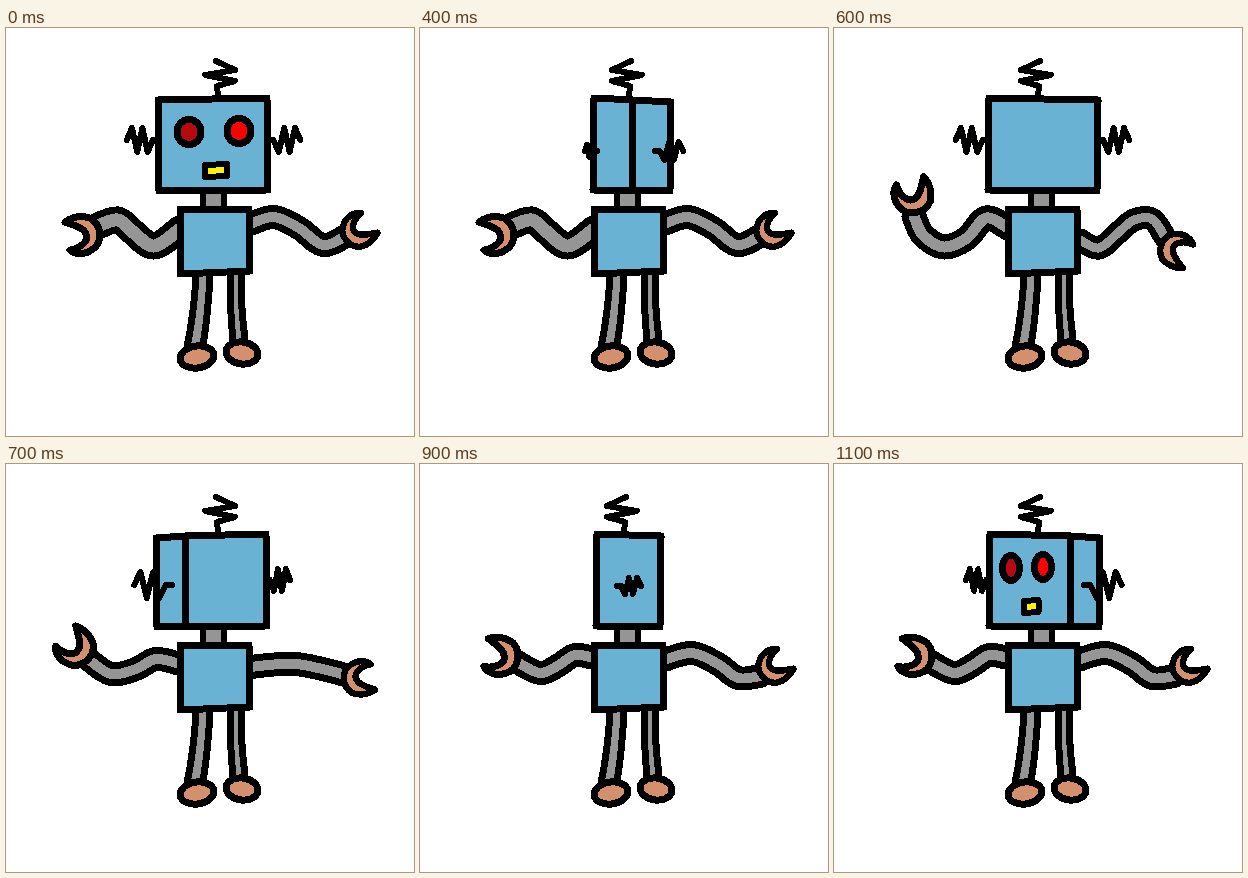
These frames come from a looping animation (408x408 px, 1200 ms). An HTML page:

```html
<!DOCTYPE html>
<html lang="en">
<head>
<meta charset="utf-8">
<title>Robot turning its head</title>
<style>
  html, body { margin: 0; width: 100%; height: 100%; overflow: hidden; background: #fff; }
  svg { display: block; width: 100%; height: 100%; }
  svg * { stroke-linecap: round; stroke-linejoin: round; }
  .ink { fill: none; stroke: #000; stroke-width: 7; }
  .thin { fill: none; stroke: #000; stroke-width: 6; }
  .blue { fill: #6ab2d3; }
  .skin { fill: #d48f6c; }
  .grey { fill: #959595; }
  .dark { fill: #b40a10; }
  .red { fill: #f00; }
  .yellow { fill: #fff200; }
  .band { fill: none; stroke: #000; }
  .band.core { stroke: #959595; }
  .pose { visibility: hidden; animation: show 1200ms step-end infinite; }
  @keyframes show {
    0% { visibility: visible; }
    8.33333%, 100% { visibility: hidden; }
  }
</style>
</head>
<body>
<svg viewBox="0 0 408 408" shape-rendering="crispEdges">
  <path class="grey" d="M190 246H205L197 320H181ZM223 246H234L239 314H227ZM196 163H217V181H196Z"/>
  <path class="ink" d="M190 248Q188 286 181 319M204 248Q202 288 197 317M224 247Q224 282 227 313M235 247Q235 282 239 311"/>
  <path class="thin" d="M197 165V180M218 165V180"/>
  <ellipse class="ink skin" cx="191" cy="329" rx="17" ry="11" transform="rotate(-8 191 329)"/>
  <ellipse class="ink skin" cx="236" cy="325" rx="16" ry="11" transform="rotate(8 236 325)"/>
  <g id="poses"></g>
  <path class="ink blue" d="M174 181L243 181L244 243L174 246Z"/>
</svg>
<script>
const STEP = 100, COUNT = 12, MIRROR = 416;

const path = (cls, d, extra = '') => `<path class="${cls}" d="${d}" ${extra}/>`;

// Catmull-Rom spline through "x,y x,y ..."
function curve(text) {
  const p = text.split(' ').map(s => s.split(',').map(Number));
  const at = i => p[Math.max(0, Math.min(p.length - 1, i))];
  return `M${p[0]}` + p.slice(1).map((c, i) => {
    const [a, b, e] = [at(i - 1), p[i], at(i + 2)];
    const h1 = b.map((v, k) => v + (c[k] - a[k]) / 6);
    const h2 = c.map((v, k) => v - (e[k] - b[k]) / 6);
    return `C${h1} ${h2} ${c}`;
  }).join('');
}

// A claw open to the left, turned clockwise by angle
const claw = (x, y, angle, size) => path('ink skin',
  'M-19-13Q-8-21 6-17C19-9 18 8 9 14C0 21-10 19-14 15C-2 13 5 5 2-1C0-7-8-9-19-13Z',
  `transform="translate(${x} ${y}) rotate(${angle}) scale(${size})"`);

function arm(spine, width, x, y, angle, size = 1) {
  const d = curve(spine);
  return path('band', d, `stroke-width="${width + 7}"`) +
    path('band core', d, `stroke-width="${width - 7}"`) + claw(x, y, angle, size);
}

const arms = {
  level: arm('174,201 148,218 127,204 112,192 94,197', 20, 78, 207, 0) +
    arm('244,196 268,189 293,200 317,217 340,208', 17, 351, 203, 150, .9),
  mid: arm('174,194 155,191 139,201 120,209 97,198', 17, 82, 193, 19) +
    arm('244,196 272,189 298,200 318,214 340,212', 17, 353, 203, 150, .9),
  out: arm('174,198 150,191 130,193 113,201 98,203', 17, 80, 205, 18) +
    arm('246,207 277,188 297,197 316,210 334,206', 17, 345, 191, 122, .9),
  rising: arm('174,200 150,195 130,205 105,210 82,195', 17, 70, 185, 55) +
    arm('244,203 290,200 340,211', 17, 352, 214, 180, .9),
  raised: arm('174,200 152,190 133,210 110,219 89,207 80,188', 18, 79, 169, 83) +
    arm('246,212 265,220 285,204 300,192 318,191 331,209', 16, 341, 221, 213, .9)
};

const antenna = path('thin', 'M206 33L187 42L217 47L187 53L205 58L204 68');

// A stub followed by alternating peaks
const ear = (x, y, dx, height) => path('thin', 'M' +
  [0, 0, 1, -1, 1, -1, 0].map((k, i) => [x + dx * i, y + k * height]).join('L'));

const box = (left, fold, right) => antenna +
  path('ink blue', `M${left} 70L${fold} 72L${right} 74L${right - 1} 163L${left - 1} 162Z`) +
  (fold < right ? path('ink', `M${fold} 72L${fold - 1} 163`) : '');

const heads = {
  flat: box(155, 264, 264) + ear(154, 112, -5.4, 12) + ear(264, 112, 5.2, 12),
  turned: box(156, 237, 266) + ear(156, 116, -4, 11) + ear(250, 121, 6.3, 13),
  half: box(169, 208, 246) + ear(172, 123, -2, 6) + ear(230, 123, 4.7, 9),
  side: box(177, 241, 241) + ear(197, 122, 4, 8)
};

const eye = (cls, x, y, r) => `<ellipse class="ink ${cls}" cx="${x}" cy="${y}" rx="${r}" ry="12.5"/>`;
const mouth = (x, w) => path('thin yellow', `M${x - w} 137L${x + w} 136L${x + w} 148L${x - w} 149Z`);

const face = (a, b, m, r) => eye('dark', a, 104, r) + eye('red', b, 103, r) + mouth(m, r - 1);

// Face seen almost from the side; dir is the way the eyes bulge
const sliver = (x, dir) => `<g transform="translate(${x} 98) scale(${dir} 1)">` +
  path('thin red', 'M-10-11Q5 0-9 11ZM1-11Q17 0 2 11Q6 0 1-11Z') + '</g>' + mouth(x, 4);

const faces = {
  front: face(183, 233, 210, 12),
  left: face(177, 209, 197, 8.5),
  right: face(MIRROR - 209, MIRROR - 177, MIRROR - 197, 8.5),
  farLeft: sliver(183, -1),
  farRight: sliver(230, 1)
};

// arms, head, mirrored, face, shift
const poses = [
  ['level', 'flat', 1, 'front'],
  ['mid', 'turned', 1, 'right'],
  ['out', 'half', 1, 'farRight', -2],
  ['mid', 'side', 1],
  ['level', 'half', 0, '', 5],
  ['rising', 'turned', 0],
  ['raised', 'flat', 0],
  ['rising', 'turned', 1],
  ['level', 'half', 1, '', 5],
  ['mid', 'side', 0],
  ['out', 'half', 0, 'farLeft'],
  ['mid', 'turned', 0, 'left']
];

document.getElementById('poses').innerHTML = poses.map(([limbs, head, flip, look, dx = 0], i) => {
  const place = flip ? `matrix(-1 0 0 1 ${MIRROR - dx} 0)` : `translate(${dx} 0)`;
  return `<g class="pose" style="animation-delay:${(i - COUNT) * STEP}ms">${arms[limbs]}` +
    `<g transform="${place}">${heads[head]}</g>${faces[look] || ''}</g>`;
}).join('');
</script>
</body>
</html>
```
